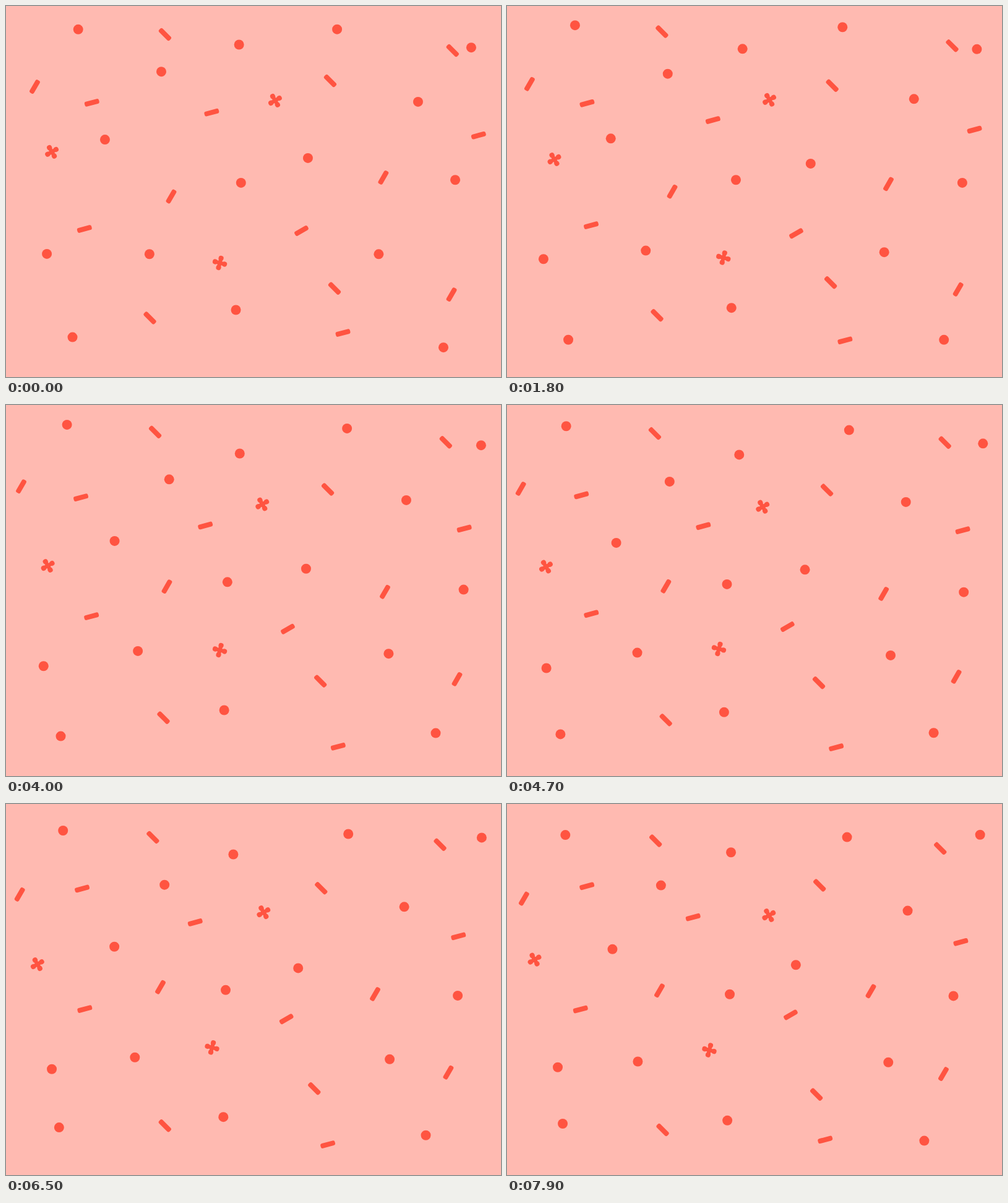
Write an HTML page that moves like this. It is 800 by 600 pixels and loops after 8 s.

```html
<!DOCTYPE html>
<html lang="en">
<head>
<meta charset="utf-8">
<title>Drifting confetti</title>
<style>
  html, body { margin: 0; width: 100%; height: 100%; overflow: hidden; background: #ffbab1; }
  svg { display: block; width: 800px; height: 600px; }
</style>
</head>
<body>
<svg viewBox="0 0 800 600" fill="#ff5441" stroke="none"></svg>
<script>
const LOOP = 8000, STEP = 100, TURN = 15000;
const SVG = 'http://www.w3.org/2000/svg';
const stage = document.querySelector('svg');

function add(parent, name, attrs) {
  const el = document.createElementNS(SVG, name);
  for (const key in attrs) el.setAttribute(key, attrs[key]);
  return parent.appendChild(el);
}

function dot(g) {
  add(g, 'circle', { r: 8 });
}

const bar = angle => g =>
  add(g, 'rect', { x: -12, y: -4, width: 24, height: 8, rx: 3, transform: `rotate(${angle})` });

const cross = angle => g => {
  for (let i = 0; i < 4; i++) {
    const arm = add(g, 'g', { transform: `rotate(${angle + i * 90})` });
    add(arm, 'rect', { x: -3, y: -3, width: 11, height: 6 });
    add(arm, 'circle', { cx: 7.8, r: 4.1 });
  }
};

const steep = bar(-60), rise = bar(-30), flat = bar(-15), fall = bar(45);
const star = cross(-30), plus = cross(15);

// Rings of orbits, each wider than the one before.
// A piece is its shape, the centre of its orbit and the starting angle.
const left = [
  [[dot, 759, 59, 131], [fall, 248, 52, -34], [fall, 711, 71, 5], [steep, 257, 304, 22]],
  [[dot, 105, 43, -24], [dot, 656, 163, -39], [dot, 221, 408, -32], [dot, 363, 501, -48],
    [plus, 337, 406, 48]],
  [[dot, 369, 296, -43], [dot, 73, 414, -118], [steep, 36, 141, -45], [star, 428, 166, -62],
    [flat, 124, 346, 79]],
  [[dot, 691, 547, 18], [fall, 515, 462, -18], [steep, 714, 451, 69], [flat, 748, 215, -20]]
];
const right = [
  [[dot, 370, 71, -52], [dot, 543, 45, -137], [dot, 166, 225, -124], [dot, 610, 409, -135],
    [fall, 515, 127, -34]],
  [[dot, 251, 119, -90], [dot, 478, 254, -39], [dot, 98, 527, 42], [flat, 133, 145, 63]],
  [[dot, 725, 296, -86], [fall, 243, 515, -135], [rise, 467, 353, 45]],
  [[steep, 600, 291, -54], [flat, 317, 179, -24], [flat, 530, 537, -30], [star, 60, 245, -33]]
];

const pieces = [];
function place(rings, spin) {
  rings.forEach((ring, i) => {
    const radius = 10.8 + 2 * i;
    for (const [shape, cx, cy, phase] of ring) {
      const el = add(stage, 'g', {});
      shape(el);
      pieces.push({ el, cx, cy, phase, radius, spin });
    }
  });
}
place(left, -1);
place(right, 1);

function draw(ms) {
  for (const { el, cx, cy, phase, radius, spin } of pieces) {
    const a = (phase + spin * 360 * ms / TURN) * Math.PI / 180;
    const x = cx + radius * Math.cos(a);
    const y = cy + radius * Math.sin(a);
    el.setAttribute('transform', `translate(${x.toFixed(2)} ${y.toFixed(2)})`);
  }
}

const start = performance.now();
function tick() {
  const ms = (performance.now() - start) % LOOP;
  draw(Math.floor(ms / STEP) * STEP);
  requestAnimationFrame(tick);
}
tick();
</script>
</body>
</html>
```
